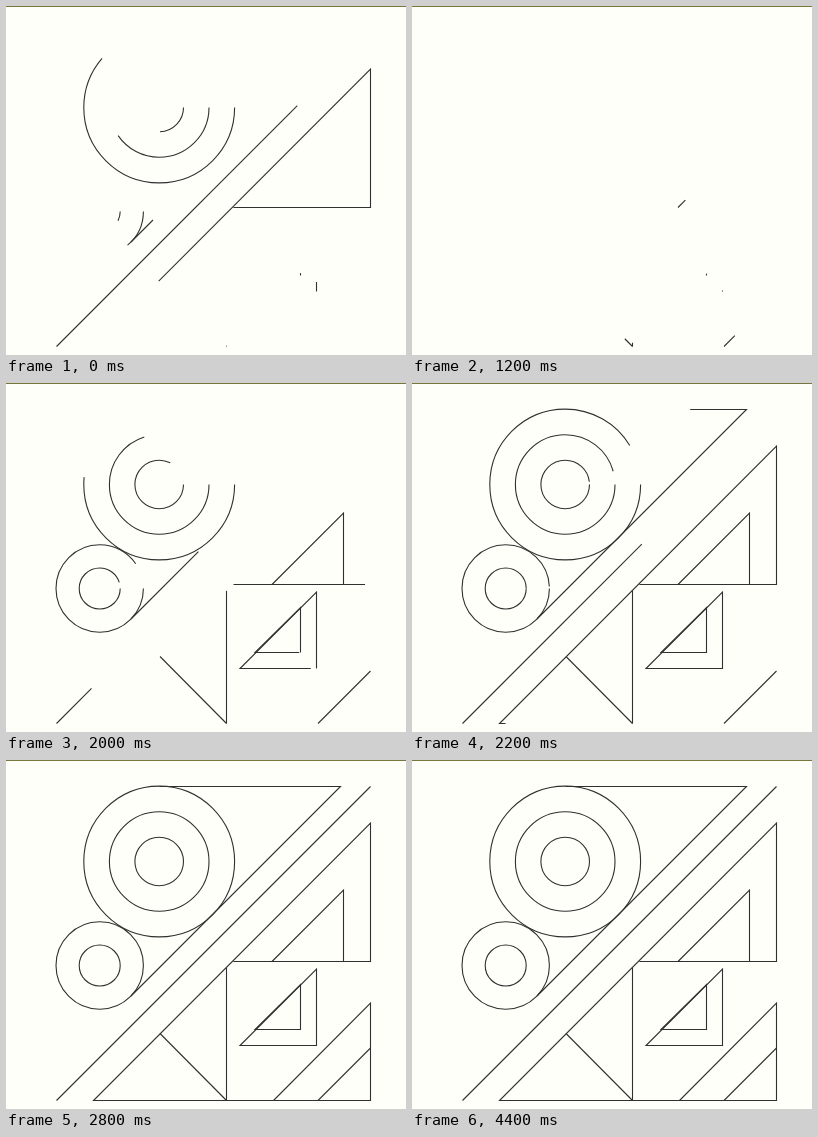
Animation of 400x349 px, one loop 4.99 s. Source, as an HTML page:

```html
<!DOCTYPE html>
<html lang="en">
<head>
<meta charset="utf-8">
<title>Line drawing</title>
<style>
  html, body { margin: 0; width: 100%; height: 100%; overflow: hidden; background: #fffffa; }
  svg { display: block; width: 100%; height: 100%; }
  #art { fill: none; stroke: #303030; stroke-width: 1.1; }
</style>
</head>
<body>
<svg viewBox="0 0 400 349" preserveAspectRatio="none">
  <rect width="400" height="1" fill="#77773c"/>
  <!-- data-in and data-out are places in the stagger of drawing and erasing -->
  <g id="art" transform="translate(.5 .5)">
    <path data-in="0" d="M311.5 340L364 287.5"/>
    <path data-in="1" d="M220 340L153.5 273"/>
    <path data-in="2" d="M265.5 201L337 129.5V201"/>
    <path data-in="3" d="M220 340V207"/>
    <path data-in="4" d="M294 269V224L248.500 269Z"/>
    <path data-in="5" d="M310 285V208.5L233.5 285Z"/>
    <circle data-in="6" cx="93.2" cy="205" r="20.5"/>
    <circle data-in="7" cx="93.2" cy="205" r="43.7"/>
    <circle data-in="8" cx="152.7" cy="101" r="24.3"/>
    <circle data-in="9" cx="152.7" cy="101" r="49.8"/>
    <circle data-in="10" cx="152.7" cy="101" r="75.4"/>
    <path data-in="11.9" data-out="5.8" d="M124.5 235.5L334 26H153"/>
    <path data-in="12.9" data-out="11" d="M50 340L364 26"/>
    <path data-in="12.9" data-out="9.4" d="M227 201H364V62.5L87 340H364V242.5L267 340"/>
  </g>
</svg>
<script>
  const LOOP = 4990, FPS = 15, LAST_FRAME = 66;
  const ERASED = 700;      // ms at which erasing gives way to drawing
  const STAGGER = 0.0458;  // share of one stroke's duration

  const strokes = [...document.querySelectorAll('#art > *')].map(el => {
    el.setAttribute('pathLength', 1);
    const drawSlot = +el.dataset.in;
    return { el, drawSlot, eraseSlot: +(el.dataset.out || drawSlot) };
  });

  const easeInOutQuint = x => {
    const u = Math.min(1, Math.max(0, x));
    return u < 0.5 ? 16 * u ** 5 : 1 - 16 * (1 - u) ** 5;
  };

  // Progress of the first stroke; drawing speeds up slightly midway.
  const drawLead = t => 0.768 + (t - 1733) / (t < 1733 ? 1527 : 1382);
  const eraseLead = t => 0.933 + t / 1250;

  function visiblePart(stroke, t) {
    return t < ERASED
      ? 1 - easeInOutQuint(eraseLead(t) - STAGGER * stroke.eraseSlot)
      : easeInOutQuint(drawLead(t) - STAGGER * stroke.drawSlot);
  }

  function render(now) {
    const frame = Math.min(LAST_FRAME, Math.floor((now % LOOP) * FPS / 1000 + 0.06));
    const t = frame * 1000 / FPS;
    for (const stroke of strokes) {
      const part = visiblePart(stroke, t);
      stroke.el.style.visibility = part < 0.001 ? 'hidden' : 'visible';
      stroke.el.style.strokeDasharray = part > 0.9995 ? 'none' : `${part} 2`;
    }
  }

  const start = performance.now();
  function tick() {
    render(performance.now() - start);
    requestAnimationFrame(tick);
  }
  tick();
</script>
</body>
</html>
```
